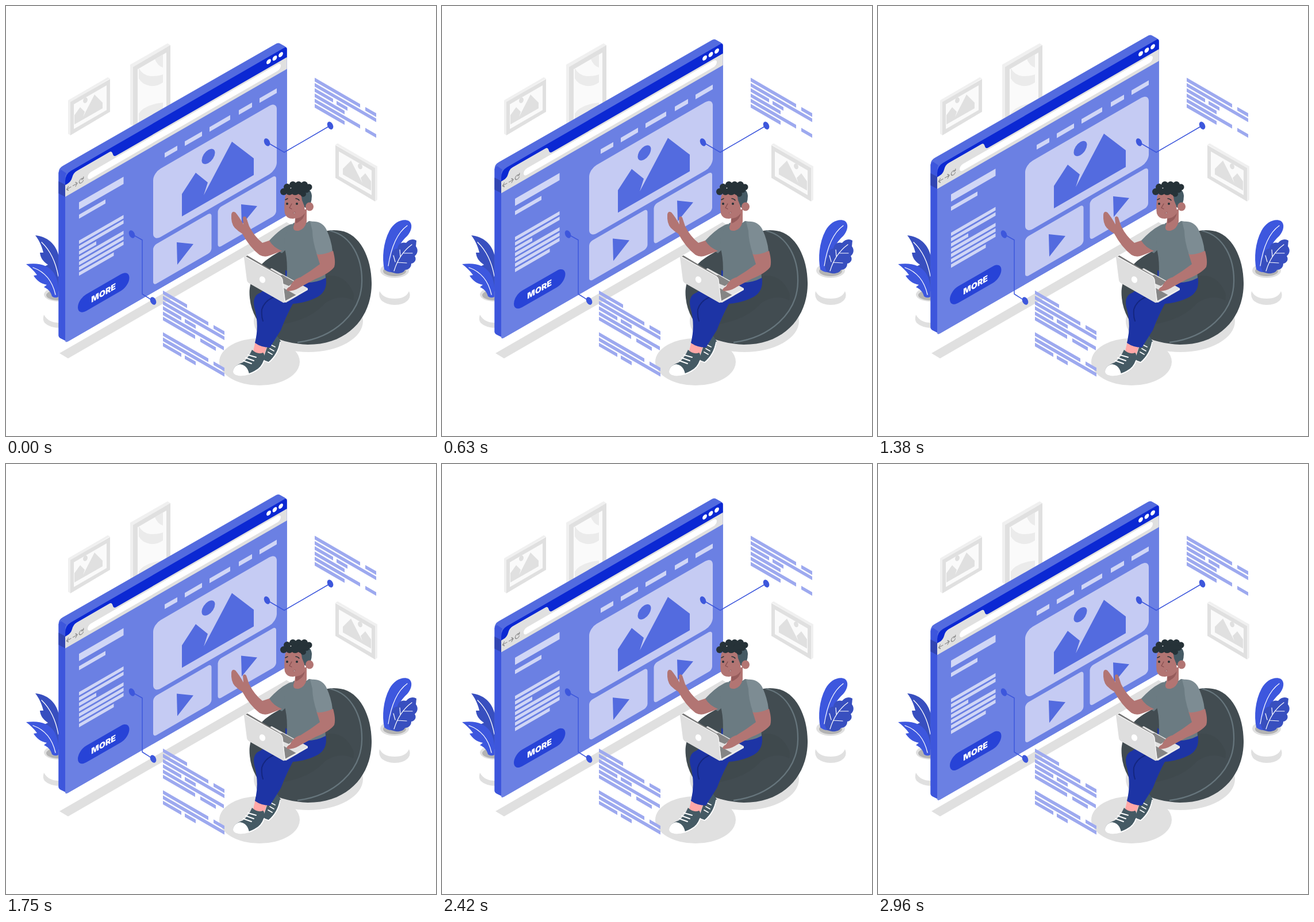
An HTML page that plays this animation: 748x748 px, repeating every 3000 ms.

```html
<!DOCTYPE html>
<html lang="en">
<head>
<meta charset="utf-8">
<title>Browser window illustration</title>
<style>
html, body { margin: 0; width: 100%; height: 100%; overflow: hidden; background: #fff; }
svg { display: block; width: 100vw; height: 100vh; }
.line { fill: none; stroke-linecap: round; stroke-linejoin: round; }
.more { font: 900 14.2px Inter, "Open Sans", sans-serif; text-anchor: middle; fill: #fff; }
</style>
</head>
<body>
<svg viewBox="0 0 748 748">
  <defs>
    <g id="picture">
      <path fill="#f0f0f0" d="M108 164L177 124L181 126L112 168V225L108 222Z"/>
      <path fill="#e0e0e0" d="M112 167L181 127V184L112 225Z"/>
      <path fill="#fafafa" d="M118 171L175 138V181L118 214Z"/>
      <path fill="#e0e0e0" d="M119 206V190L129 176L137 184L134 193L154 154L168 168V178Z"/>
      <ellipse cx="138" cy="164" rx="3.8" ry="5" transform="rotate(20 138 164)" fill="#e0e0e0"/>
    </g>
    <clipPath id="art"><path d="M229 110L279 81V190L229 220Z"/></clipPath>
  </defs>

  <!-- wall -->
  <use href="#picture"/>
  <use href="#picture" transform="matrix(-1 0 0 1 754 115)"/>
  <path fill="#f0f0f0" d="M216 102L281 65L286 68L221 106V209L216 206Z"/>
  <path fill="#e0e0e0" d="M221 106L286 68V172L221 210Z"/>
  <path fill="#fafafa" d="M229 110L279 81V190L229 220Z"/>
  <g clip-path="url(#art)" fill="#ebebeb">
    <path d="M231 108Q238 121 252 122Q266 122 273 119V133Q260 142 247 138Q236 135 231 126Z"/>
    <path d="M259 92L273 84V107Q263 104 259 92Z"/>
    <path d="M231 187Q240 172 273 168V190L231 215Z"/>
  </g>

  <!-- floor and plants -->
  <g fill="#e0e0e0">
    <path d="M93 604L488 376L503 385L108 613Z"/>
    <ellipse cx="441" cy="619" rx="70" ry="41"/>
    <ellipse cx="526" cy="548" rx="95" ry="54"/>
    <path d="M66 537Q63 545 67 551Q76 560 95 560V551Q74 552 66 537Z"/>
    <path d="M650 496Q647 506 654 513Q663 520 676 520Q691 520 699 512Q705 505 701 496Q696 509 676 509Q656 509 650 496Z"/>
    <ellipse cx="91" cy="502" rx="25" ry="12"/>
    <ellipse cx="676" cy="460" rx="25" ry="13"/>
  </g>
  <ellipse cx="91" cy="503" rx="21" ry="9" fill="#b3b3b3"/>
  <ellipse cx="676" cy="461" rx="20" ry="9" fill="#b3b3b3"/>
  <path fill="#384fbf" d="M51 399C72 401 86 414 91 432L96 440V500L86 492C86 474 82 464 74 458L67 453L73 450C64 444 60 438 59 429L65 429C62 416 57 407 51 399Z"/>
  <path fill="#3d57de" d="M35 449C58 446 74 451 83 464C91 476 92 490 91 506Q85 509 80 505C78 497 73 492 66 489L71 485C60 483 53 477 48 469L54 468C48 460 42 454 35 449Z"/>
  <g class="line" stroke="#fff" stroke-width="1.3">
    <path d="M62 411Q84 432 91 470M47 455Q78 466 86 502"/>
  </g>
  <path fill="#3d57de" d="M658 458C654 438 656 412 667 391C676 374 692 369 701 374C708 379 706 391 698 400C686 411 682 420 679 432L671 463Q663 463 658 458Z"/>
  <path fill="#384fbf" d="M670 463C664 454 665 443 671 437C670 428 675 422 681 422C682 413 689 410 696 412C701 406 708 404 714 408L713 418C717 423 717 430 711 435C715 441 711 447 705 448C705 455 700 459 694 459C692 464 684 466 678 465Z"/>
  <g class="line" stroke="#fff" stroke-width="1.2">
    <path d="M698 382Q673 400 665 452M706 415Q684 431 675 461M686 436L685 424M692 430L707 430M681 446L697 447M677 445L674 434"/>
  </g>

  <!-- floating browser window -->
  <g id="win">
    <path fill="#536bdf" d="M91.500 290Q91.500 282 99 278L470 65.500Q474 63.500 477 65.500L485 70Q488.700 72 488.700 76V364L107 584L95 578Q91.500 576 91.500 573Z"/>
    <path fill="#3d56dc" d="M91.500 290Q93 286 96 285L105 291Q103 294 103 298V582L107 584L95 578Q91.500 576 91.500 573Z"/>
    <path fill="#3145b2" d="M91.500 305L103 311V332L91.500 326Z"/>
    <g transform="matrix(1 -.577 0 1 0 0)">
      <path fill="#6b80e3" d="M103 390H488.700V645.700H107Q103 645.700 103 641Z"/>
      <path fill="#0b28d3" d="M103 373V364Q103 352 113 352H483Q488.700 352 488.700 357V373Z"/>
      <path fill="#e0e0e0" d="M103 371H107Q113 371 115 365Q117 358 123 358H180Q184 358 185.500 364Q187 371 192 371H488.700V391.500H103Z"/>
      <rect x="142" y="374" width="336" height="11.500" rx="5.700" fill="#fff"/>
      <g fill="#fff">
        <circle cx="457" cy="360.500" r="3.900"/><circle cx="467.500" cy="360.500" r="3.900"/><circle cx="478" cy="360.500" r="3.900"/>
      </g>
      <path class="line" stroke="#8d8d8d" stroke-width="1.300" d="M113 380H105.500M108.500 376.500L105.500 380L108.500 383.500M116.500 380H124M121 376.500L124 380L121 383.500M134 377.500A3.700 3.700 0 1 0 134.500 381M134.700 375V378H131.500"/>
      <g id="bars" fill="#d0d6f6"></g>
      <g fill="#c5cbf3">
        <rect x="256" y="438" width="215" height="119" rx="13"/>
        <rect x="256" y="565" width="101.500" height="69" rx="6"/>
        <rect x="368.500" y="565" width="101.500" height="69" rx="6"/>
      </g>
      <circle cx="352" cy="465" r="11.500" fill="#536bdf"/>
      <rect x="125" y="582" width="89.500" height="29" rx="14.500" fill="#2743d7"/>
      <text class="more" x="169.700" y="602">MORE</text>
    </g>
    <path fill="#536bdf" d="M306 366V327L330 290L351 307L344 329L393 236L431 265V294Z"/>
    <path fill="#536bdf" d="M297 411L326 414L298 450ZM409 345L437 348L410 381Z"/>
  </g>

  <!-- callouts -->
  <g class="line" stroke="#3d57dc" stroke-width="1.500">
    <path d="M454 237L484 254.500L564 208M219 397L237 407V501L256 513"/>
  </g>
  <g id="dots" fill="#3d57dc"></g>
  <g id="notes" fill="#9da9ef" transform="matrix(1 .577 0 1 0 0)"></g>

  <!-- bean bag -->
  <path fill="#424c51" d="M424 507C421 482 433 462 446 448C459 435 480 426 497 415L550 393Q566 388 582 391C616 396 637 440 636 485C635 541 596 589 525 589Q486 587 462 574Q427 545 424 507Z"/>
  <path fill="#394247" d="M556 470Q575 466 590 478Q609 498 604 512Q580 500 555 517Q530 545 483 553L500 515Z" opacity=".35"/>
  <path class="line" stroke="#66757c" stroke-width="2.300" d="M564 391C602 400 620 440 619 480C618 535 570 577 508 585"/>

  <!-- person -->
  <path fill="#455a64" d="M454 594L467 570Q474 575 478 584Q474 606 458 619Q450 621 448 612Z"/>
  <path class="line" stroke="#fff" stroke-width="1.800" d="M477 585Q473 607 457 620L449 617M456 602L463 606M459 596L466 600M462 590L468 593"/>
  <path fill="#ffa8a7" d="M434 583L455 590L449 606Q439 608 430 600Z"/>
  <path fill="#455a64" d="M428 598Q438 607 447 603Q451 606 449 616Q445 628 434 634Q418 643 406 641Q394 640 396 631Q400 624 412 620Q422 612 428 598Z"/>
  <path fill="#fff" d="M407 623Q420 625 423 640Q412 645 400 642Q393 639 396 631Q399 625 407 623Z"/>
  <path class="line" stroke="#fff" stroke-width="2" d="M449 617Q445 629 434 635Q419 644 404 642M413 617L427 622M417 612L431 617M421 607L435 611"/>
  <path fill="#1d34a5" d="M486 470V459L500 470H556C560 490 552 502 538 508Q522 516 499 518Q487 540 478 564L459 594Q444 594 433 586Q441 555 432 524Q428 504 442 499Z"/>
  <path class="line" stroke="#142680" stroke-width="2" d="M470 505Q450 511 445 528Q444 540 447 548"/>
  <path fill="#6b7b82" d="M497 379Q479 385 457 409Q465 422 480 430L496 415Z"/>
  <path fill="#b27573" d="M458 408L446 412Q432 401 423 383Q420 374 418 368Q415 364 412 368L413 380Q406 367 399 359Q393 356 392 363Q391 378 398 386Q404 392 411 396Q424 420 441 433Q450 438 459 434L480 426Q465 420 458 408Z"/>
  <path fill="#6b7b82" d="M501 377Q517 383 527 374Q543 375 549 391L556 473Q526 489 488 474Q491 443 484 419Q483 389 501 377Z"/>
  <path fill="#b27573" d="M503 360L523 353V375Q520 388 509 391Q499 392 500 384Q504 374 503 360Z"/>
  <path fill="#965c5c" d="M503 370Q514 369 520 360Q518 373 504 378Z"/>
  <path fill="#455a64" d="M510 321Q530 312 532 330Q532 345 524 352L517 349Z"/>
  <path fill="#b27573" d="M486 329Q483 349 485 361Q488 370 499 370Q512 368 520 357L519 348L515 338L513 325Q498 319 486 329Z"/>
  <ellipse cx="528" cy="349" rx="7" ry="7.500" fill="#b27573"/>
  <g id="curls" fill="#263238"></g>
  <g fill="#263238"><circle cx="489" cy="344" r="2"/><circle cx="506" cy="344" r="2"/></g>
  <path class="line" stroke="#263238" stroke-width="1.500" d="M486 337L490 335M504 335Q508 335 510 338"/>
  <path class="line" stroke="#874e4f" stroke-width="1.300" d="M497 344L493 351L497 353"/>
  <path fill="#fff" stroke="#874e4f" stroke-width=".7" d="M499 360Q501 360 503 358Q503 361 501 361Z"/>

  <!-- laptop and typing arm -->
  <path fill="#e3e3e3" d="M451 463L462 456L525 491V494L487 516L480 514Z"/>
  <path fill="#858585" d="M470 470L481 468L502 480L492 487L480 482ZM480 489L505 503L486 513Z"/>
  <path fill="#757575" d="M414 437L420 434L480 470L479 475Z"/>
  <path fill="#dedede" d="M414 437Q414 434 418 436L477 470Q480 472 481 476L486 512Q486 517 482 516L424 483Q420 481 419 477Z"/>
  <path class="line" stroke="#f5f5f5" stroke-width="1.200" d="M416 436L477 470Q480 472 481 476L485 514L524 493"/>
  <ellipse cx="446" cy="476" rx="5" ry="6" fill="#fff" transform="rotate(-25 446 476)"/>
  <path fill="#b27573" d="M540 430L569 426Q574 444 571 454Q563 465 538 475Q523 483 512 489Q502 496 490 496Q485 493 494 488Q500 475 512 472Q529 462 546 449Z"/>
  <path fill="#7d8c93" d="M529 375Q549 373 557 388Q566 407 568 426Q554 433 541 432Q533 409 533 391Z"/>
</svg>
<script>
const $ = id => document.getElementById(id);
const add = (id, tag, attrs) => {
  const el = document.createElementNS('http://www.w3.org/2000/svg', tag);
  for (const key in attrs) el.setAttribute(key, attrs[key]);
  $(id).append(el);
};
const bar = (id, x, y, right, height) => add(id, 'rect', { x, y, width: right - x, height });

// page content: left column, then navigation
bar('bars', 127, 415, 204.5, 12.5);
bar('bars', 127, 436.5, 173, 7);
[204.5, 204.5, 157, 204.5, 204.5, 204.5, 187.5].forEach((r, i) => bar('bars', 127, 481.5 + i * 9.2, r, 6));
[[276, 298], [311, 341], [354, 390], [405, 428], [441, 471]].forEach(([x, r]) => bar('bars', x, 415, r, 8));

// rows of note text: start and end pairs relative to the left edge
const note = (x, y, rows) => rows.forEach((row, i) => {
  for (let k = 0; k < row.length; k += 2) bar('notes', x + row[k], y + i * 9.1, x + row[k + 1], 6.3);
});
const para = [[0, 79, 88, 107], [0, 107], [0, 32, 38, 57]];
note(537, -185, [...para, [0, 52], [0, 79, 88, 107], [0, 52]]);
note(273, 337.5, [[0, 42], ...para, [0, 106], [0, 56, 65, 92]]);
note(273, 410, para);

for (const [x, y] of [[454, 237], [564, 208], [219, 397], [256, 513]])
  add('dots', 'ellipse', { cx: x, cy: y, rx: 4.8, ry: 7.2, transform: `rotate(-25 ${x} ${y})` });

for (const [cx, cy, r] of [[483, 323, 6], [489, 315, 6], [499, 311, 6], [509, 311, 6], [519, 311, 6],
  [527, 315, 5.5], [493, 323, 6], [503, 321, 8], [514, 321, 8], [523, 320, 5], [517, 327, 5]])
  add('curls', 'circle', { cx, cy, r });

// the window rises and sinks 15 px at a steady speed
const loop = 3000, rise = 15, rest = 0.5, lead = 60;
const start = performance.now();
function draw() {
  const p = ((performance.now() - start + lead) % loop) / loop;
  const y = rest - rise * (1 - Math.abs(1 - 2 * p));
  $('win').setAttribute('transform', `translate(0 ${y.toFixed(2)})`);
  requestAnimationFrame(draw);
}
draw();
</script>
</body>
</html>
```
